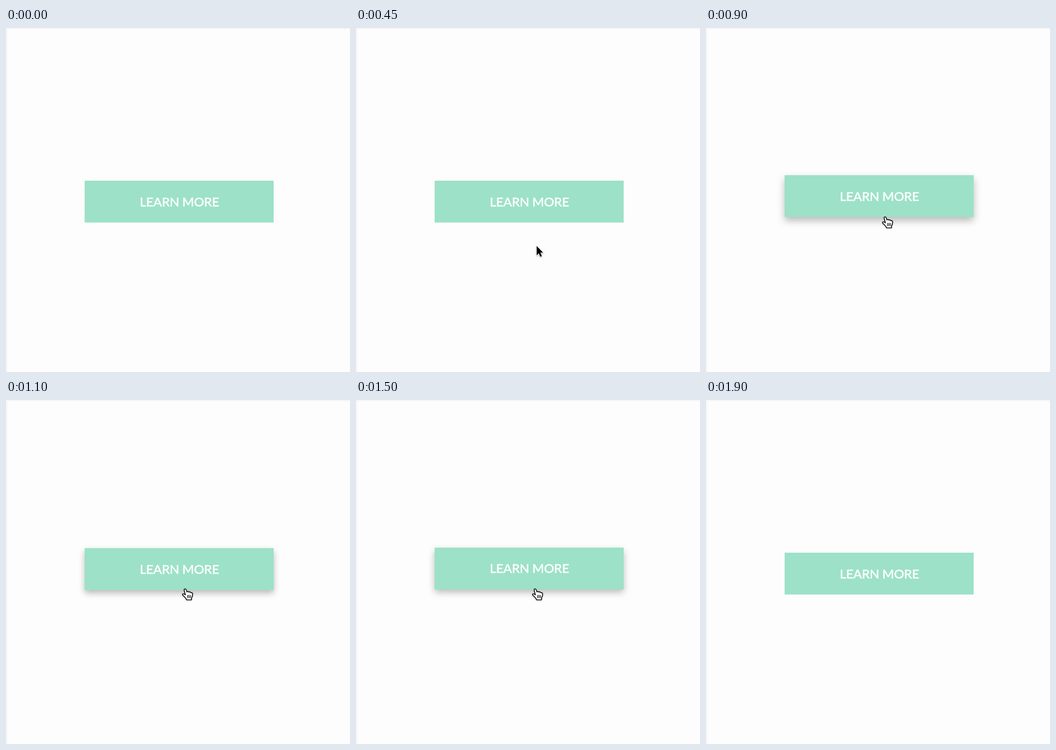
An HTML page for the animation above (2.25 s loop, 748 by 748 pixels).

```html
<!DOCTYPE html>
<html lang="en">
<head>
<meta charset="utf-8">
<title>Button hover</title>
<style>
  html, body { margin: 0; width: 100%; height: 100%; overflow: hidden; background: #fdfdfd; }
  #stage { position: absolute; inset: 0; overflow: hidden; }
  #stage::before {
    content: ""; position: absolute; inset: 0;
    background: linear-gradient(90deg, #f6f6f6 2px, transparent 4px),
                linear-gradient(#f5f5f5 1px, transparent 4px);
  }
  #button { position: absolute; left: 170.5px; top: 332px; width: 411px; height: 91px; background: #9de1c9; }
  svg { position: absolute; left: 0; top: 0; overflow: visible; }
  text {
    font: 500 27.6px Lato, "Open Sans", sans-serif; letter-spacing: -.3px;
    fill: #fbfffd; stroke: #fbfffd; stroke-width: .45px;
  }
  #arrow, #hand { filter: drop-shadow(0 1.5px 1.5px rgba(0, 0, 0, .35)); }
</style>
</head>
<body>
<div id="stage">
  <div id="button">
    <svg width="411" height="91"><text id="label" x="206" y="55.5" text-anchor="middle">LEARN MORE</text></svg>
  </div>
  <svg id="arrow" width="20" height="30">
    <path d="M1 2V22.3L5.6 18L9 25.6L12.3 24.2L9 16.7H15Z" fill="#000" stroke="#fff" stroke-width="2" paint-order="stroke"/>
  </svg>
  <svg id="hand" width="26" height="28" fill="#fff" stroke="#000" stroke-width="1.7" stroke-linejoin="round" stroke-linecap="round">
    <path d="M5 4C4.2 1 8 .3 9 2.8L11 8C11.8 6.2 14.8 6.4 15.3 8.6C16.4 7 19 7.6 19.5 9.8C21 8.8 23.4 9.6 23.3 12.3C23.2 16 22.4 18.8 20.8 21V25H10.2C9.6 22.6 6.8 19.8 5.2 18L1.8 14.8C.4 12.8 2.4 11 4.6 12.4L7.6 14.4Z"/>
    <path d="M12.2 15V20.5M15.2 15V20.5M18.2 15V20.5" stroke-width="1.4"/>
  </svg>
</div>
<script>
const LOOP = 2250, STEP = 50;
const [button, arrow, hand] = ["button", "arrow", "hand"].map(id => document.getElementById(id));

// start, end, lift at start, lift at end
const moves = [
  [650, 900, 0, 12],
  [1000, 1250, 12, 6],
  [1350, 1550, 6, 12],
  [1550, 1850, 12, 0]
];

const smooth = u => u * u * (3 - 2 * u);

function liftAt(t) {
  let lift = 0;
  for (const [start, end, from, to] of moves) {
    if (t < start) break;
    lift = from + (to - from) * smooth(Math.min(1, (t - start) / (end - start)));
  }
  return lift;
}

function pointerAt(t) {
  if (t < 1500) {
    const rest = Math.max(0, 1 - t / 575) ** 1.28;
    return [391 + 6 * rest, 421 + 359 * rest];
  }
  const out = Math.min(1, (t - 1500) / 400) ** 1.3;
  return [391 + 8 * out, 421 + 350 * out];
}

function place(el, x, y, shown) {
  el.style.transform = `translate(${x}px, ${y}px)`;
  el.style.visibility = shown ? "visible" : "hidden";
}

function draw(t) {
  const lift = liftAt(t), k = lift / 12;
  button.style.transform = `translateY(${-lift}px)`;
  button.style.boxShadow = `0 ${8 * k}px ${16 * k}px rgba(0, 0, 0, ${.27 * Math.min(1, k * 2)})`;

  const [x, y] = pointerAt(t);
  const over = t >= 700 && t < 1550;
  place(arrow, x, y, !over && y < 760);
  place(hand, 382.5, 409.5, over);
}

const origin = performance.now();
function tick() {
  const t = (performance.now() - origin) % LOOP;
  draw(Math.floor(t / STEP) * STEP);
  requestAnimationFrame(tick);
}
tick();
</script>
</body>
</html>
```
